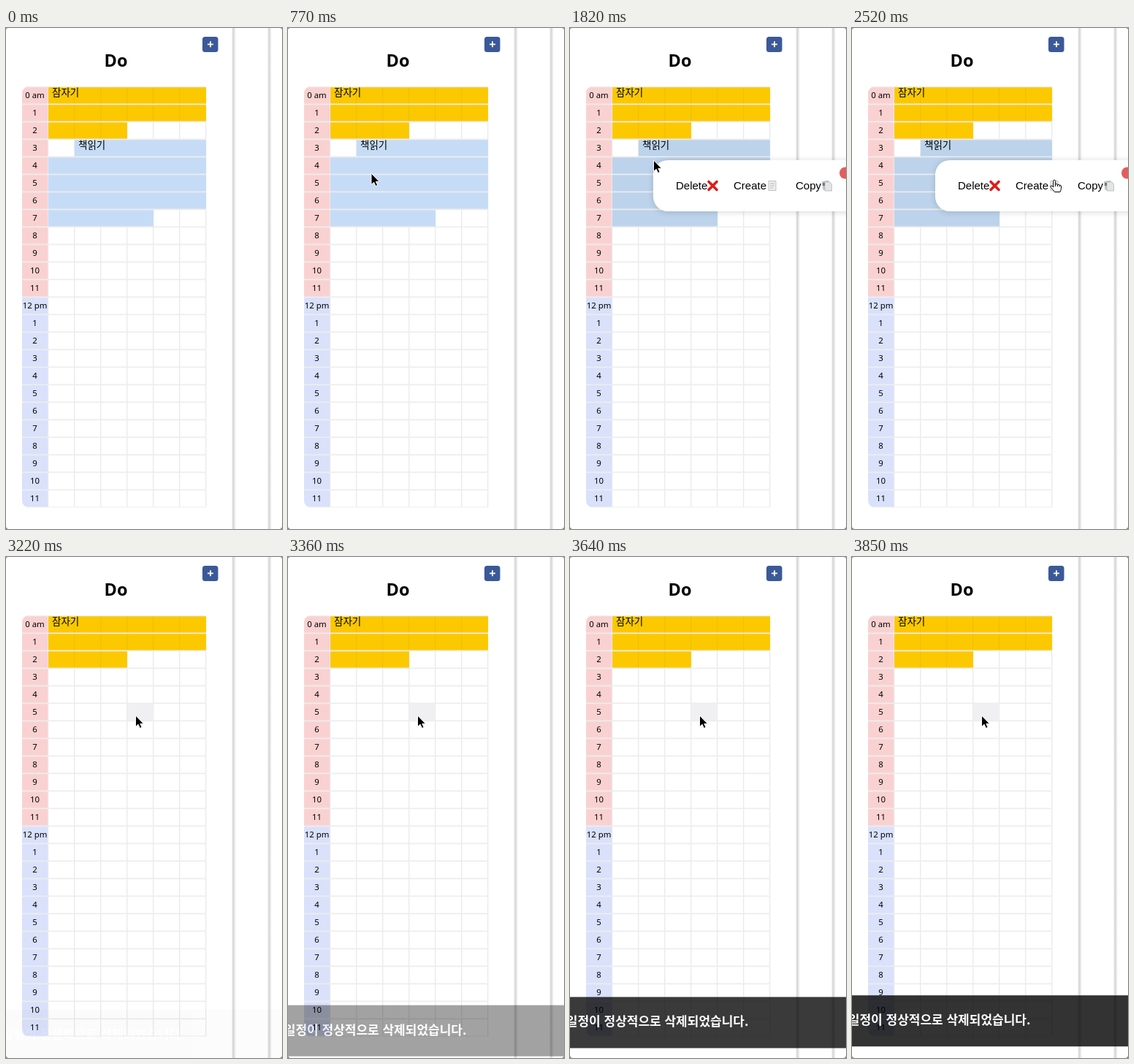
Animation, 378 px wide and 686 px high, one loop 4.13 s. Source, as an HTML page:

```html
<!DOCTYPE html>
<html lang="ko">
<head>
<meta charset="utf-8">
<title>Day planner</title>
<style>
html, body { margin: 0; width: 100%; height: 100%; overflow: hidden; background: #fff; }
svg { display: block; width: 378px; height: 686px; }
.hour { font: 11.4px "Noto Sans", sans-serif; text-anchor: middle; }
.title { font: 700 23.5px "Noto Sans", sans-serif; text-anchor: middle; }
.task { font: 13.5px "Noto Sans CJK KR", "Noto Sans CJK", sans-serif; }
.item { font: 15px "Liberation Sans", sans-serif; }
.note { font: 700 17px "Noto Sans CJK KR", "Noto Sans CJK", sans-serif; fill: #fff; text-anchor: end; }
#menuBox { filter: drop-shadow(0 1px 4px rgba(0,0,0,.16)); }
</style>
</head>
<body>
<svg viewBox="0 0 378 686">
  <defs>
    <linearGradient id="fade">
      <stop offset="0" stop-color="#fff"/>
      <stop offset=".35" stop-color="#d2d2d2"/>
      <stop offset="1" stop-color="#fff"/>
    </linearGradient>
    <clipPath id="tableClip"><rect x="22" y="80" width="270" height="576.5" rx="9"/></clipPath>
  </defs>
  <rect width="378" height="686" fill="#fff"/>
  <rect x="309" width="6" height="686" fill="url(#fade)"/>
  <rect x="358" width="6" height="686" fill="url(#fade)"/>
  <text class="title" x="150.5" y="53">Do</text>
  <rect x="269" y="12" width="21.5" height="21" rx="3.5" fill="#3b5998"/>
  <path d="M276 22.3h8M280 18.3v8" stroke="#fff" stroke-width="1.8"/>

  <g clip-path="url(#tableClip)">
    <g id="hours"></g>
    <g id="columns" stroke="#ebebeb" stroke-width="1.4"></g>
    <g id="sleep" fill="#fcc800"></g>
    <g id="read"></g>
    <rect id="hover" width="36" height="24"/>
    <g id="rows" stroke="#ededed" stroke-width="1.6"></g>
  </g>
  <g id="labels"></g>
  <text class="task" x="63" y="93">잠자기</text>
  <text class="task" id="readName" x="99" y="165">책읽기</text>

  <g id="menu">
    <rect id="menuBox" x="114" y="181" width="290" height="70" rx="20" fill="#fff"/>
    <circle cx="377" cy="198.5" r="8" fill="#e25d5d"/>
    <text class="item" x="145" y="221">Delete</text>
    <text class="item" x="224" y="221">Create</text>
    <text class="item" x="309" y="221">Copy</text>
    <path d="M190 210.500l11 11M201 210.500l-11 11" stroke="#dd1c1a" stroke-width="3.6" stroke-linecap="round"/>
    <path d="M272 209.500h10v13h-10z" fill="#eee" stroke="#aaa" stroke-width=".7"/>
    <path d="M274 213h6M274 216h6M274 219h4" stroke="#aaa" stroke-width=".8"/>
    <path d="M345 210l9-1.500 1.500 12-9 1.500z" fill="#c3c6c8"/>
    <path d="M349 211h7l2.500 3v9H349z" fill="#e3e5e6" stroke="#a9acae" stroke-width=".7"/>
    <path d="M346 212h3v4h-3z" fill="#777"/>
  </g>

  <circle id="press" cx="177" cy="217" r="31" fill="#000" fill-opacity=".1"/>
  <path id="arrow" d="M0 0V15.500L3.600 12.200 6 17.500 8.700 16.300 6.300 11.300H11Z" fill="#000" stroke="#fff" stroke-linejoin="round"/>
  <path id="hand" d="M-1.700 1.500Q-1.700 0 -.4 0T1.200 1.500V6Q3 4.800 4 6.400 6 5.500 6.700 7.200 9 6.600 9 9V11.500Q9 13.500 7.500 16.500H0Q-1.500 14-5 10.500-6.500 8.600-5 8T-1.700 10ZM1.200 6V9M4 6.500V9M6.700 7.300V9.300" fill="#fff" stroke="#000" stroke-linejoin="round"/>

  <g id="toast">
    <rect width="378" height="70" fill="#000" fill-opacity=".8"/>
    <text class="note" x="244.500" y="40">일정이 정상적으로 삭제되었습니다.</text>
  </g>
  <path d="M0 0h3Q0 0 0 3zM378 0h-3q3 0 3 3zM0 686h4q-4 0-4-4zM378 686h-4q4 0 4-4z" fill="#777"/>
</svg>
<script>
const LOOP = 4130, STEP = 70;
const LEFT = 58, TOP = 80, COL = 36, ROW = 24;
const CLICK = 1680, CLOSE = 3010, REMOVE = 3150, NOTIFY = 3205;
const $ = id => document.getElementById(id);

function add(parent, tag, attrs, text) {
  const el = document.createElementNS("http://www.w3.org/2000/svg", tag);
  for (const key in attrs) el.setAttribute(key, attrs[key]);
  if (text) el.textContent = text;
  $(parent).append(el);
}
const cells = (id, row, from, to) => add(id, "rect", {
  x: LEFT + from * COL, y: TOP + row * ROW, width: (to - from) * COL, height: ROW
});
const line = (id, d, extra) => add(id, "path", { d, ...extra });

for (let i = 0; i < 24; i++) {
  const y = TOP + i * ROW;
  add("hours", "rect", { x: 22, y, width: COL, height: ROW, fill: i < 12 ? "#fad1d1" : "#d9e1fb" });
  const name = i === 0 ? "0 am" : i === 12 ? "12 pm" : String(i % 12);
  add("labels", "text", { class: "hour", x: 39.5, y: y + 15.5 }, name);
}
for (let i = 0; i <= 24; i++) line("rows", `M22 ${TOP + 0.4 + i * ROW}H274`);
for (let i = 0; i <= 6; i++) line("columns", `M${LEFT + i * COL - 0.3} 80V656`);

[[0, 0, 6], [1, 0, 6], [2, 0, 3]].forEach(c => cells("sleep", ...c));
for (let i = 1; i < 6; i++)
  line("sleep", `M${LEFT + i * COL - 0.3} 80v${i < 3 ? 72 : 48}`, { stroke: "#efbd00" });
const reading = [[3, 1, 6], [4, 0, 6], [5, 0, 6], [6, 0, 6], [7, 0, 4]];
reading.forEach(c => cells("read", ...c));

// Pointer stops: time, x, y
const path = [
  [210, 178, 640], [280, 162, 420], [350, 147, 274], [420, 147, 274],
  [490, 140, 260], [560, 112, 236], [630, 92, 222], [700, 104, 208],
  [770, 114, 199], [840, 116, 193], [910, 116, 191], [1190, 116, 191],
  [1400, 115.5, 183], [1540, 115.5, 181], [1680, 114.5, 181], [2170, 114.5, 181],
  [2240, 124, 184], [2380, 195, 203], [2520, 277.5, 208],
  [2590, 300, 214], [2660, 245, 217], [2730, 177.5, 217]
];
function pointer(t) {
  const i = path.findIndex(p => p[0] > t);
  if (i < 0) return path[path.length - 1].slice(1);
  if (i === 0) return null;
  const [t0, x0, y0] = path[i - 1], [t1, x1, y1] = path[i];
  const k = (t - t0) / (t1 - t0);
  return [x0 + (x1 - x0) * k, y0 + (y1 - y0) * k];
}
function cellAt(t) {
  const p = pointer(t);
  if (!p) return null;
  const c = Math.floor((p[0] - LEFT) / COL), r = Math.floor((p[1] - TOP) / ROW);
  return c >= 0 && c < 6 && r >= 0 && r < 24 ? [r, c] : null;
}

// CSS "ease" curve
function ease(x) {
  x = Math.min(1, Math.max(0, x));
  let lo = 0, hi = 1, u = 0;
  for (let i = 0; i < 20; i++) {
    u = (lo + hi) / 2;
    const bx = 0.75 * u * (1 - u) * (1 - u) + 0.75 * u * u * (1 - u) + u * u * u;
    bx < x ? lo = u : hi = u;
  }
  return 0.3 * u * (1 - u) * (1 - u) + 3 * u * u * (1 - u) + u * u * u;
}
const show = (id, on) => $(id).setAttribute("visibility", on ? "visible" : "hidden");

function draw(t) {
  const open = t >= CLICK && t < CLOSE, hasReading = t < REMOVE;
  show("menu", open);
  show("read", hasReading);
  show("readName", hasReading);
  $("read").setAttribute("fill", t >= CLICK ? "#bcd3eb" : "#c6dcf6");

  // A cell lights up once the pointer has settled in it
  const cell = cellAt(t), before = cellAt(t - 2 * STEP);
  const lit = !open && cell && before && cell.join() === before.join();
  show("hover", lit);
  if (lit) {
    const [r, c] = cell;
    const busy = hasReading && reading.some(e => e[0] === r && c >= e[1] && c < e[2]);
    $("hover").setAttribute("x", LEFT + c * COL);
    $("hover").setAttribute("y", TOP + r * ROW);
    $("hover").setAttribute("fill", busy ? "#cae3fc" : "#f0f0f2");
  }

  const p = pointer(t);
  const onItem = open && p && p[1] > 200 &&
    [[145, 203], [224, 286], [309, 360]].some(([a, b]) => p[0] >= a && p[0] <= b);
  show("arrow", p && !onItem);
  show("hand", onItem);
  if (p) for (const id of ["arrow", "hand"]) $(id).setAttribute("transform", `translate(${p})`);
  show("press", t >= 2800 && t < 2870);

  $("toast").setAttribute("opacity", ease((t - NOTIFY) / 570));
  $("toast").setAttribute("transform", `translate(0 ${620 - 20 * ease((t - NOTIFY) / 740)})`);
}

const start = performance.now();
function tick() {
  const t = (performance.now() - start) % LOOP;
  draw(Math.floor(t / STEP) * STEP);
  requestAnimationFrame(tick);
}
tick();
</script>
</body>
</html>
```
